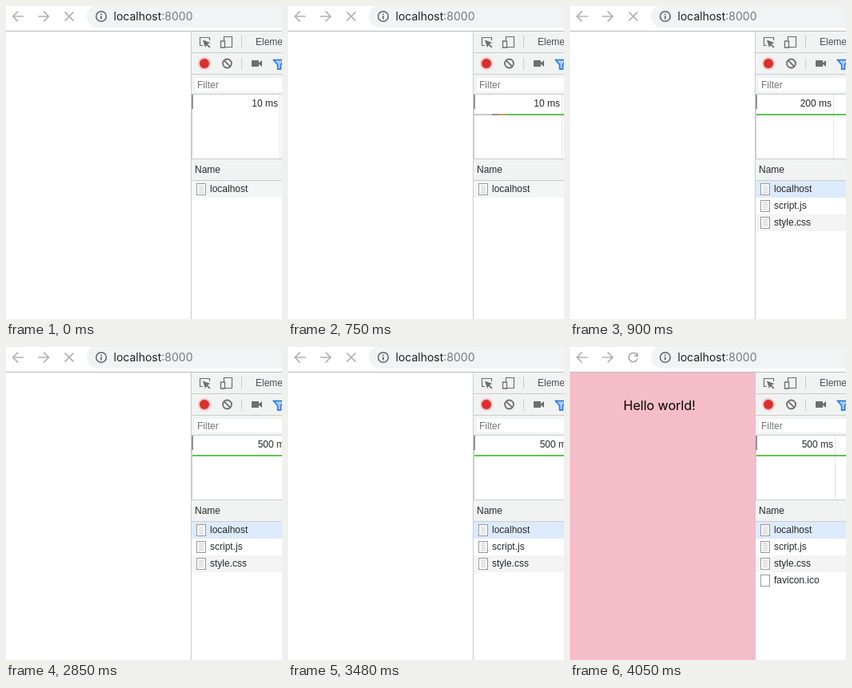
Write an HTML page with a canvas that moves like this. It is 345x392 px and loops after 4.65 s.

```html
<!DOCTYPE html>
<html lang="en">
<head>
<meta charset="utf-8">
<title>Page load</title>
<style>
  html, body { margin: 0; width: 100%; height: 100%; overflow: hidden; background: #fff; }
  canvas { display: block; }
</style>
</head>
<body>
<canvas id="stage" width="345" height="392"></canvas>
<script>
const ctx = document.getElementById('stage').getContext('2d');
const LOOP = 4650;
const AT = { firstBytes: 750, assets: 900, rescale: 2850, painted: 3900, loaded: 4050 };
const UI = '12px "Liberation Sans", Arial, sans-serif';
const SYS = 'Inter, sans-serif';
const INK = '#27292c', ICON = '#6e6e6e', BAR = '#f1f3f3', RULE = '#cbcbcb';

function box(x, y, w, h, color) {
  ctx.fillStyle = color;
  ctx.fillRect(x, y, w, h);
}

function text(s, x, y, color = INK, font = UI, align = 'left') {
  ctx.font = font;
  ctx.textAlign = align;
  ctx.fillStyle = color;
  ctx.fillText(s, x, y);
}

function stroke(d, color, width = 1) {
  ctx.strokeStyle = color;
  ctx.lineWidth = width;
  ctx.stroke(new Path2D(d));
}

function fill(d, color) {
  ctx.fillStyle = color;
  ctx.fill(new Path2D(d));
}

function disc(x, y, r, color) {
  ctx.fillStyle = color;
  ctx.beginPath();
  ctx.arc(x, y, r, 0, Math.PI * 2);
  ctx.fill();
}

function ring(x, y, r, color, width, from = 0, to = Math.PI * 2) {
  ctx.strokeStyle = color;
  ctx.lineWidth = width;
  ctx.beginPath();
  ctx.arc(x, y, r, from, to);
  ctx.stroke();
}

function addressBar(loaded) {
  const nav = '#b0b2b4', busy = '#a9abad';
  box(0, 0, 345, 31, '#fff');
  box(0, 31, 345, 1, '#b9bbbc');
  stroke('M22 13H9M15 6.7L8.7 13L15 19.3', nav, 1.7);
  stroke('M40 13H53M47 6.7L53.3 13L47 19.3', nav, 1.7);
  if (loaded) {
    ring(79, 13, 5.5, busy, 1.7, 0.25, 5.4);
    fill('M85.3 6.5V12H79.8Z', busy);
  } else {
    stroke('M73.5 7.5L84.5 18.5M84.5 7.5L73.5 18.5', busy, 1.6);
  }
  ctx.fillStyle = '#f1f3f4';
  ctx.beginPath();
  ctx.roundRect(101, -1, 300, 28, 14);
  ctx.fill();
  ring(119, 13, 6.3, '#5f6368', 1.5);
  box(118.2, 9.5, 1.6, 1.6, '#5f6368');
  box(118.2, 12.2, 1.6, 4.3, '#5f6368');
  text('localhost', 134.5, 18, '#202124', '14px ' + SYS);
  const w = ctx.measureText('localhost').width;
  text(':8000', 134.5 + w, 18, '#75797d', '14px ' + SYS);
}

function tools() {
  box(232, 32, 113, 79, BAR);
  for (const y of [58, 85, 110]) box(232, y, 113, 1, RULE);

  stroke('M246 49.5H242.5V39.5H254.5V43', ICON, 1.2);
  fill('M246 42.5L255.5 46L251.8 47.6L255.6 51.4L254.3 52.6L250.6 48.9L249 52Z', ICON);
  stroke('M272.5 43V38.5H282.5V51.5H274', ICON, 1.2);
  stroke('M268.5 44H273.5V52H268.5Z', ICON, 1.3);
  box(294, 37, 1, 15, RULE);
  text('Elements', 312, 49, '#4c4f52');

  disc(248, 72, 8, '#f4c5c4');
  disc(248, 72, 6, '#d9302e');
  ring(276.5, 72, 5.5, ICON, 1.8);
  stroke('M272.8 68.3L280.2 75.7', ICON, 1.8);
  box(294, 65, 1, 15, RULE);
  box(307, 68, 9, 8, ICON);
  fill('M315 72L320 68V76Z', ICON);
  fill('M334 67H349L343.5 74V80H339.5V74Z', '#a9cbf8');
  stroke('M334.5 67.5H348.5L343.5 73.5V79H339.5V73.5Z', '#1a73e8', 1.5);

  box(236, 90, 109, 17, '#fff');
  text('Filter', 239, 103, '#757575');
}

function timeline(t) {
  const early = t < AT.assets;
  const mark = early ? 342 : t < AT.rescale ? 329 : t < AT.painted ? 356 : 331;
  const label = early ? '10 ms' : t < AT.rescale ? '200 ms' : '500 ms';
  const green = '#63c158';
  box(232, 111, 113, 80, '#fff');
  box(mark, 111, 1, 80, '#e4e4e4');
  text(label, mark - 2, 126, INK, UI, 'right');
  box(232, 111, 1, 80, RULE);
  box(232, 111, 2, 18, '#929292');
  if (t >= AT.firstBytes) {
    box(233, 135, 112, 2, green);
    if (early) {
      box(233, 135, 22, 2, '#c9c9c9');
      box(255, 135, 9, 2, '#8f9594');
      box(264, 135, 8, 2, '#d99a58');
    }
  }
}

function row(i, name, color, blank) {
  const y = 219 + i * 21;
  box(232, y, 113, 21, color);
  box(238, y + 3, 12, 15, '#999');
  box(239, y + 4, 10, 13, '#fff');
  if (!blank) for (let k = 0; k < 5; k++) box(241, y + 6 + k * 2, 6, 1, '#cfcfcf');
  text(name, 255, y + 14);
}

function requests(t) {
  box(232, 191, 113, 28, BAR);
  box(232, 191, 113, 1, RULE);
  box(232, 218, 113, 1, RULE);
  text('Name', 236, 209);
  row(0, 'localhost', t < AT.assets ? '#f4f5f5' : '#dcebfc');
  if (t >= AT.assets) {
    row(1, 'script.js', '#fff');
    row(2, 'style.css', '#f4f4f4');
  }
  if (t >= AT.loaded) row(3, 'favicon.ico', '#fff', true);
}

function draw(t) {
  box(0, 0, 345, 392, '#fff');
  addressBar(t >= AT.loaded);
  if (t >= AT.painted) {
    box(0, 32, 231, 360, '#f5bdc8');
    text('Hello world!', 111.8, 79, '#000', '16px ' + SYS, 'center');
  }
  box(231, 32, 1, 360, RULE);
  tools();
  timeline(t);
  requests(t);
}

const start = performance.now();
function tick() {
  draw((performance.now() - start) % LOOP);
  requestAnimationFrame(tick);
}
tick();
</script>
</body>
</html>
```
